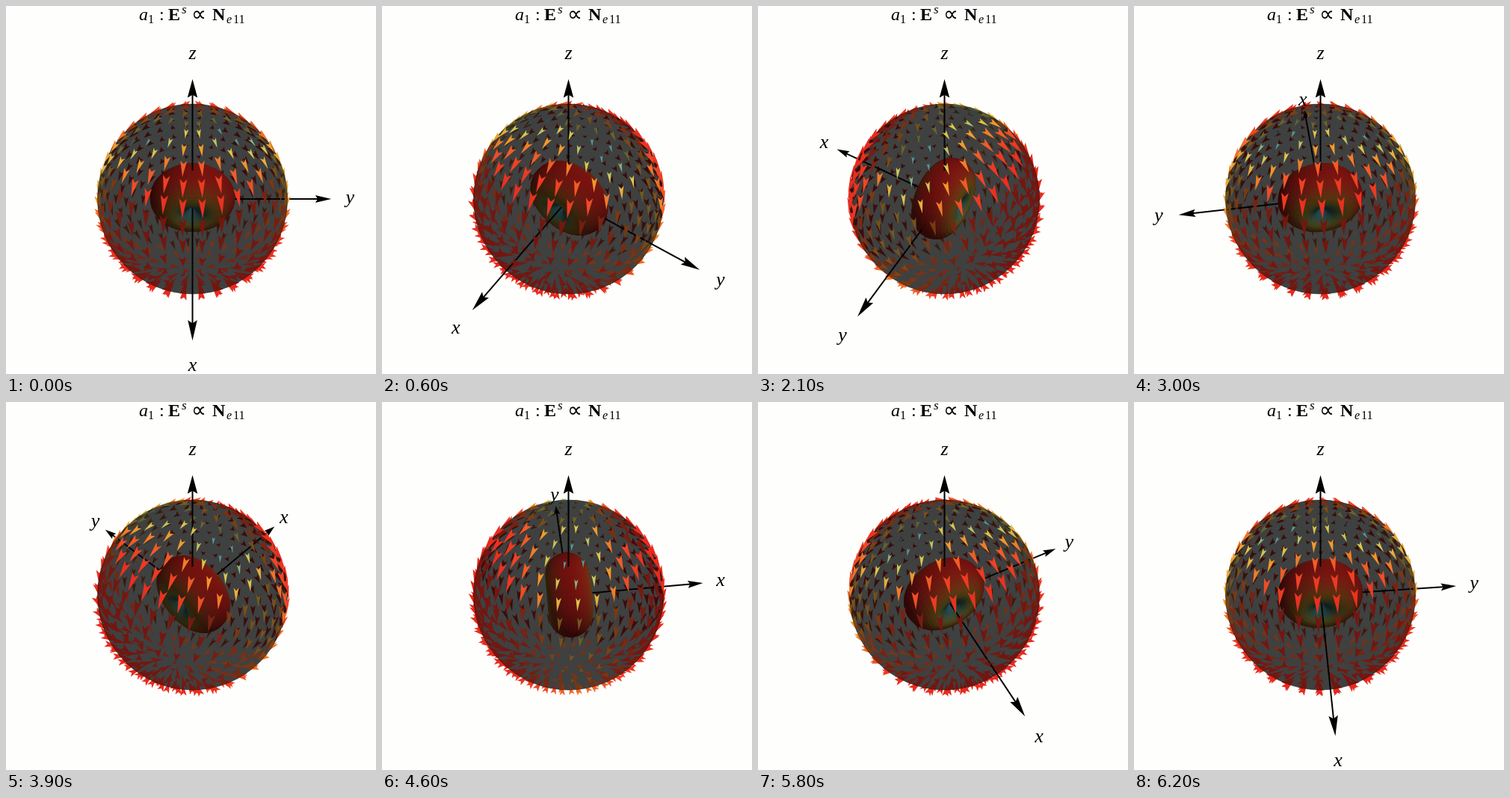
An HTML page with a canvas for the animation above (6300 ms loop, 495 px wide and 492 px high).

```html
<!DOCTYPE html>
<html lang="en">
<head>
<meta charset="utf-8">
<title>Dipole field</title>
<style>
html, body { margin: 0; width: 100%; height: 100%; overflow: hidden; background: #fefefc; }
canvas { display: block; }
</style>
</head>
<body>
<canvas id="stage" width="495" height="492"></canvas>
<script>
const ctx = document.getElementById('stage').getContext('2d');
const BG = '#fefefc', CX = 249.5, CY = 258;
const DIST = 4.1, FOCAL = 505.4, AXIS = 1.506, LABEL = 1.135;
const SIN = 0.7899, COS = 0.6132;      // camera elevation
const RIM = 127, DONUT = 0.455;
const STEP = 100, STEPS = 63;
const STOPS = [
  [0, 70, 125, 165], [0.22, 95, 165, 150], [0.42, 215, 205, 80],
  [0.62, 242, 150, 42], [0.85, 240, 70, 36], [1, 228, 34, 28]
];

const scale = (v, k) => v.map(c => c * k);
const add = (a, b) => a.map((c, i) => c + b[i]);
const dot = (a, b) => a[0] * b[0] + a[1] * b[1] + a[2] * b[2];
const unit = v => scale(v, 1 / (Math.hypot(...v) || 1));

function ramp(v) {
  v = Math.min(1, Math.max(0, v));
  let i = 1;
  while (v > STOPS[i][0]) i++;
  const a = STOPS[i - 1], b = STOPS[i], k = (v - a[0]) / (b[0] - a[0]);
  return [1, 2, 3].map(j => a[j] + (b[j] - a[j]) * k);
}
const rgb = c => `rgb(${c.map(v => Math.round(Math.min(255, v)))})`;

let sn = 0, cs = 1;
// Body coordinates to right / up / toward the viewer.
function view([x, y, z]) {
  const r = y * cs - x * sn, t = x * cs + y * sn;
  return [r, z * COS - t * SIN, t * COS + z * SIN];
}
function project(p) {
  const [r, u, w] = view(p), k = FOCAL / (DIST - w);
  return { x: CX + r * k, y: CY - u * k, w, k };
}

function poly(points, color, edge) {
  ctx.beginPath();
  points.forEach(p => ctx.lineTo(p.x, p.y));
  ctx.closePath();
  ctx.fillStyle = color;
  ctx.fill();
  if (edge) {
    ctx.strokeStyle = color;
    ctx.lineWidth = edge;
    ctx.stroke();
  }
}

function dart(tail, tip, half, notch, color) {
  const dx = tip.x - tail.x, dy = tip.y - tail.y, len = Math.hypot(dx, dy) || 1;
  const nx = -dy / len * half, ny = dx / len * half;
  poly([
    tip,
    { x: tail.x + nx, y: tail.y + ny },
    { x: tail.x + dx * notch, y: tail.y + dy * notch },
    { x: tail.x - nx, y: tail.y - ny }
  ], color);
}

function line(a, b) {
  ctx.beginPath();
  ctx.moveTo(a.x, a.y);
  ctx.lineTo(b.x, b.y);
  ctx.strokeStyle = '#000';
  ctx.lineWidth = 2;
  ctx.stroke();
}

// Sample points in rings around z.
const seeds = [];
const RINGS = 19;
for (let i = 0; i < RINGS; i++) {
  const th = (i + 0.5) / RINGS * Math.PI, s = Math.sin(th);
  const n = 2 * Math.round(19 * s + 0.5);
  for (let j = 0; j < n; j++) {
    const ph = (j + 0.5) / n * 2 * Math.PI;
    seeds.push([s * Math.cos(ph), s * Math.sin(ph), Math.cos(th)]);
  }
}

// Weak near two spots beside the upper pole and along the yz plane.
function strength([x, y, z]) {
  const spot = z > 0 ? Math.exp(-((Math.abs(y) - 0.36) ** 2 + x * x * 0.9) / 0.055) : 0;
  const band = Math.exp(-x * x / 0.16) * (0.34 + 0.12 * Math.tanh(4 * z));
  return Math.max(0.14, 0.97 - band - 0.42 * spot);
}

function fieldArrow(p, drive) {
  const along = dot(p, drive);
  const pull = add(scale(drive, 0.55), [0, 0, -1]);
  const tangent = unit(add(pull, scale(p, -dot(p, pull))));
  const radial = 1.1 * along * (p[2] - 0.68);
  const dir = unit(add(tangent, scale(p, radial)));
  const m = strength(p), half = 0.03 + 0.055 * m;
  const mid = project(p);
  return {
    tail: project(add(p, scale(dir, -half))),
    tip: project(add(p, scale(dir, half))),
    w: mid.w, width: mid.k * (0.009 + 0.024 * m),
    color: rgb(ramp(m)), front: mid.w > 1 / DIST, out: radial >= 0
  };
}

function drawArrows(list) {
  list.sort((a, b) => a.w - b.w);
  for (const a of list) dart(a.tail, a.tip, a.width, 0.2, a.color);
}

function veil() {
  ctx.beginPath();
  ctx.arc(CX, CY, RIM, 0, 2 * Math.PI);
  ctx.fillStyle = 'rgba(0,2,2,0.5)';
  ctx.fill();
}

// Horn torus around x: radius proportional to the sine of the angle from x.
const NU = 36, NV = 56;
const LIGHT = unit([0.4, 0.45, 0.8]);
const spin = (x, rho, v) => [x, rho * Math.cos(v), rho * Math.sin(v)];

function donutPoint(i, j) {
  const g = i / NU * Math.PI, r = DONUT * Math.sin(g);
  return spin(r * Math.cos(g), r * Math.sin(g), j / NV * 2 * Math.PI);
}

function donutQuads() {
  const items = [];
  for (let i = 0; i < NU; i++) {
    const g = (i + 0.5) / NU * Math.PI;
    const base = ramp(Math.sin(g) ** 2);
    for (let j = 0; j < NV; j++) {
      const n = view(spin(Math.sin(2 * g), -Math.cos(2 * g), (j + 0.5) / NV * 2 * Math.PI));
      const c = project(donutPoint(i + 0.5, j + 0.5));
      const eye = [(CX - c.x) / c.k, (c.y - CY) / c.k, DIST - c.w];
      if (dot(n, eye) < -0.15) continue;
      const color = rgb(scale(base, 0.4 + 0.66 * Math.max(0, dot(n, LIGHT))));
      const pts = [[i, j], [i + 1, j], [i + 1, j + 1], [i, j + 1]].map(q => project(donutPoint(...q)));
      items.push({ w: c.w, draw: () => poly(pts, color, 0.8) });
    }
  }
  return items;
}

const AXES = [['x', [1, 0, 0]], ['y', [0, 1, 0]], ['z', [0, 0, 1]]];

function axisPieces() {
  const items = [], N = 24;
  for (const [, d] of AXES) {
    for (let i = 0; i < N; i++) {
      const a = project(scale(d, i / N)), b = project(scale(d, (i + 1) / N));
      items.push({ w: (a.w + b.w) / 2, draw: () => line(a, b) });
    }
  }
  return items;
}

function outerAxes(front) {
  for (const [, d] of AXES) {
    const exit = project(d);
    if (exit.w > 1 / DIST !== front) continue;
    const base = project(scale(d, AXIS * 0.885)), tip = project(scale(d, AXIS));
    line(exit, project(scale(d, AXIS * 0.92)));
    dart(base, tip, 5 * base.k * DIST / FOCAL, 0.15, '#000');
  }
}

function put(text, x, y, font) {
  ctx.font = font;
  ctx.fillText(text, x, y);
}

function labels() {
  const serif = 'px "Liberation Serif", serif';
  ctx.fillStyle = '#000';
  ctx.textAlign = 'center';
  for (const [name, d] of AXES) {
    const p = project(scale(d, AXIS * LABEL));
    put(name, p.x, p.y + 6, 'italic 26' + serif);
  }
  ctx.textAlign = 'left';
  put('a', 178, 19, 'italic 24' + serif);
  put('1', 190, 23, '16' + serif);
  put(':', 205, 19, '24' + serif);
  put('E', 217, 19, 'bold 24' + serif);
  put('s', 235, 10, 'italic 17' + serif);
  put('∝', 248, 20, '28px "DejaVu Sans", sans-serif');
  put('N', 276, 19, 'bold 24' + serif);
  put('e', 295, 23, 'italic 16' + serif);
  put('11', 304, 23, '16' + serif);
}

function render(angle) {
  sn = Math.sin(angle);
  cs = Math.cos(angle);
  ctx.fillStyle = BG;
  ctx.fillRect(0, 0, 495, 492);
  ctx.lineJoin = 'round';

  const drive = unit([cs, 0.36 * sn, 0]);
  const arrows = seeds.map(p => fieldArrow(p, drive));
  const pick = (front, out) => arrows.filter(a => a.front === front && a.out === out);

  outerAxes(false);
  drawArrows(pick(false, true));
  veil();
  drawArrows(pick(false, false));
  [...donutQuads(), ...axisPieces()].sort((a, b) => a.w - b.w).forEach(q => q.draw());
  drawArrows(pick(true, false));
  veil();
  ctx.strokeStyle = 'rgba(0,0,0,0.4)';
  ctx.lineWidth = 1;
  ctx.stroke();
  drawArrows(pick(true, true));
  outerAxes(true);
  labels();
}

let last = -1;
function tick() {
  const step = Math.floor(performance.now() / STEP) % STEPS;
  if (step !== last) render(step * 0.1);
  last = step;
  requestAnimationFrame(tick);
}
tick();
</script>
</body>
</html>
```
